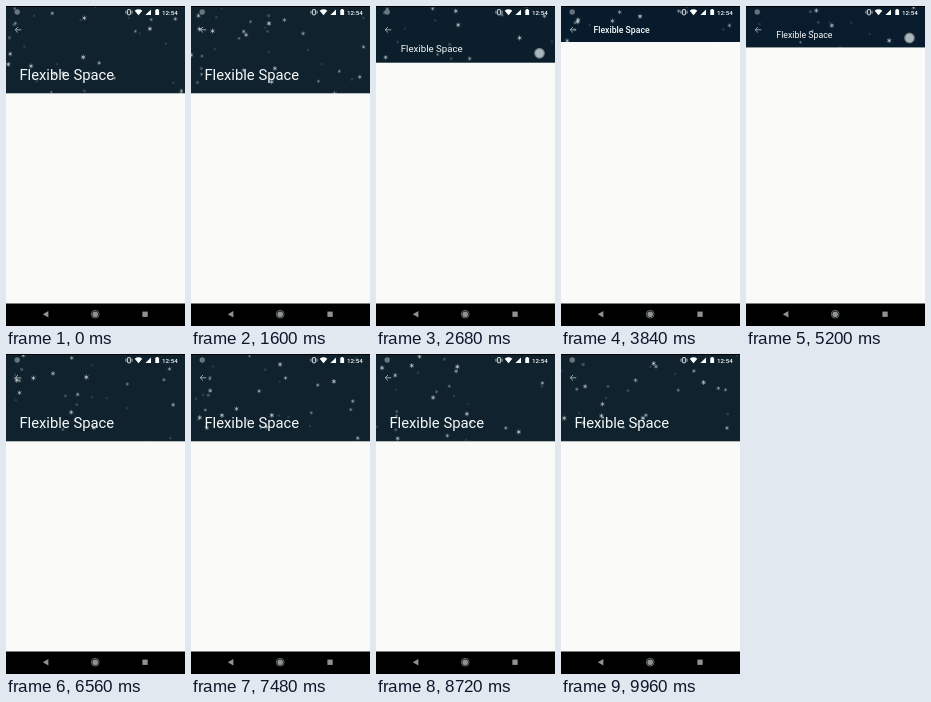
These frames come from a looping animation (179x320 px, 10000 ms). An HTML page with a canvas:

```html
<!DOCTYPE html>
<html lang="en">
<head>
<meta charset="utf-8">
<title>Flexible Space</title>
<style>
  html, body { margin: 0; width: 100%; height: 100%; overflow: hidden; background: #fafbf9; }
  canvas, svg { position: absolute; left: 0; top: 0; width: 179px; height: 320px; display: block; }
  text { font-family: Roboto, sans-serif; fill: #f6f9f9; }
</style>
</head>
<body>
<canvas id="sky"></canvas>
<svg viewBox="0 0 179 320">
  <circle cx="11.2" cy="6" r="2.7" fill="#a3aeb2" opacity=".6"/>
  <g fill="none" stroke="#fff" stroke-width=".8">
    <rect x="121.6" y="3.6" width="2.8" height="5.2" rx=".4"/>
    <path d="M120 4.7v3M126 4.7v3" stroke-width=".7"/>
    <path d="M15.3 23.8H9.4M12 21 9.2 23.8l2.8 2.8" stroke="#bcc6ca"/>
  </g>
  <g fill="#fff">
    <path d="M128.7 4.7Q132.5 1.8 136.3 4.7L132.5 9.2Z"/>
    <path d="M139.4 9.1 145 3.4v5.7Z"/>
    <path d="M149.3 3.7h1v-.7h1.8v.7h1v5.4h-3.8Z"/>
  </g>
  <text x="156" y="8.8" font-size="6.2" font-weight="500">12:54</text>
  <text id="title">Flexible Space</text>
  <rect y="297.5" width="179" height="22.5" fill="#000"/>
  <g fill="#8d9491">
    <path d="M36.8 308.2 42.4 305v6.4Z"/>
    <rect x="136.4" y="305.6" width="5.3" height="5.3"/>
    <circle cx="89.2" cy="308.2" r="2.8"/>
    <circle cx="89.2" cy="308.2" r="3.9" fill="none" stroke="#8d9491" stroke-width=".7"/>
  </g>
</svg>
<script>
const W = 179, H = 320, LOOP = 10000;
const OPEN = 87.6, CLOSED = 36;
const FALL = 100;
const canvas = document.getElementById('sky');
const ctx = canvas.getContext('2d');
const title = document.getElementById('title');
const scale = Math.max(1, window.devicePixelRatio || 1);
canvas.width = W * scale;
canvas.height = H * scale;

let seed = 41;
const rand = () => (seed = (seed * 16807) % 2147483647) / 2147483647;
const lerp = (a, b, k) => a + (b - a) * k;
const ramp = (t, start, length) => {
  const p = Math.min(1, Math.max(0, (t - start) / length));
  return p < .5 ? 2 * p * p : 1 - 2 * (1 - p) ** 2;
};

// Near flakes are larger, brighter and faster.
const flakes = Array.from({ length: 36 }, () => {
  const near = rand();
  return {
    x: rand() * W, y: rand() * FALL,
    speed: lerp(18, 42, near), drift: rand() * 8 - 4,
    size: lerp(1.1, 2.6, near), alpha: lerp(.14, .8, near * near),
    crystal: near > .45
  };
});

function disc(x, y, r, color, alpha) {
  ctx.globalAlpha = alpha;
  ctx.fillStyle = color;
  ctx.beginPath();
  ctx.arc(x, y, r, 0, Math.PI * 2);
  ctx.fill();
}

function crystal(x, y, r, alpha) {
  ctx.globalAlpha = alpha;
  ctx.strokeStyle = '#eef4f6';
  ctx.lineWidth = .6;
  ctx.beginPath();
  for (let i = 0; i < 6; i++) {
    const a = Math.PI / 6 + i * Math.PI / 3;
    ctx.moveTo(x, y);
    ctx.lineTo(x + Math.cos(a) * r, y + Math.sin(a) * r);
  }
  ctx.stroke();
  disc(x, y, r * .55, '#eef4f6', alpha * .4);
}

function snow(t) {
  const s = t / 1000;
  for (const f of flakes) {
    const x = (f.x + f.drift * s + W) % W;
    const y = (f.y + f.speed * s) % FALL - 5;
    if (f.crystal) crystal(x, y, f.size, f.alpha);
    else disc(x, y, f.size, '#c6d3d8', f.alpha);
  }
}

function fill(color, alpha, height) {
  ctx.globalAlpha = alpha;
  ctx.fillStyle = color;
  ctx.fillRect(0, 0, W, height);
}

function draw(t) {
  const fold = ramp(t, 2350, 600) - ramp(t, 5060, 610);
  const height = lerp(OPEN, CLOSED, fold);

  ctx.setTransform(scale, 0, 0, scale, 0, 0);
  fill('#fafbf9', 1, H);
  ctx.save();
  ctx.beginPath();
  ctx.rect(0, 0, W, height);
  ctx.clip();
  fill('#0f222d', 1, height);
  fill('#071b2d', fold, height);
  snow(t);
  ctx.restore();
  fill('#000', 1, 1);

  // The finger holds the lower edge while it moves.
  if (fold > 0 && fold < 1) {
    disc(163.5, height - 9.5, 5.4, '#aeb9bf', .6);
    disc(163.5, height - 9.5, 4.2, '#d5dcdf', .6);
  }

  title.setAttribute('x', lerp(13.4, 32.4, fold));
  title.setAttribute('y', lerp(74.2, 26.6, fold));
  title.setAttribute('font-size', lerp(14.8, 8.7, 1 - (1 - fold) ** 2));
  title.setAttribute('font-weight', fold > .99 ? 500 : 400);
}

const begin = performance.now();
function tick() {
  draw((performance.now() - begin) % LOOP);
  requestAnimationFrame(tick);
}
tick();
</script>
</body>
</html>
```
